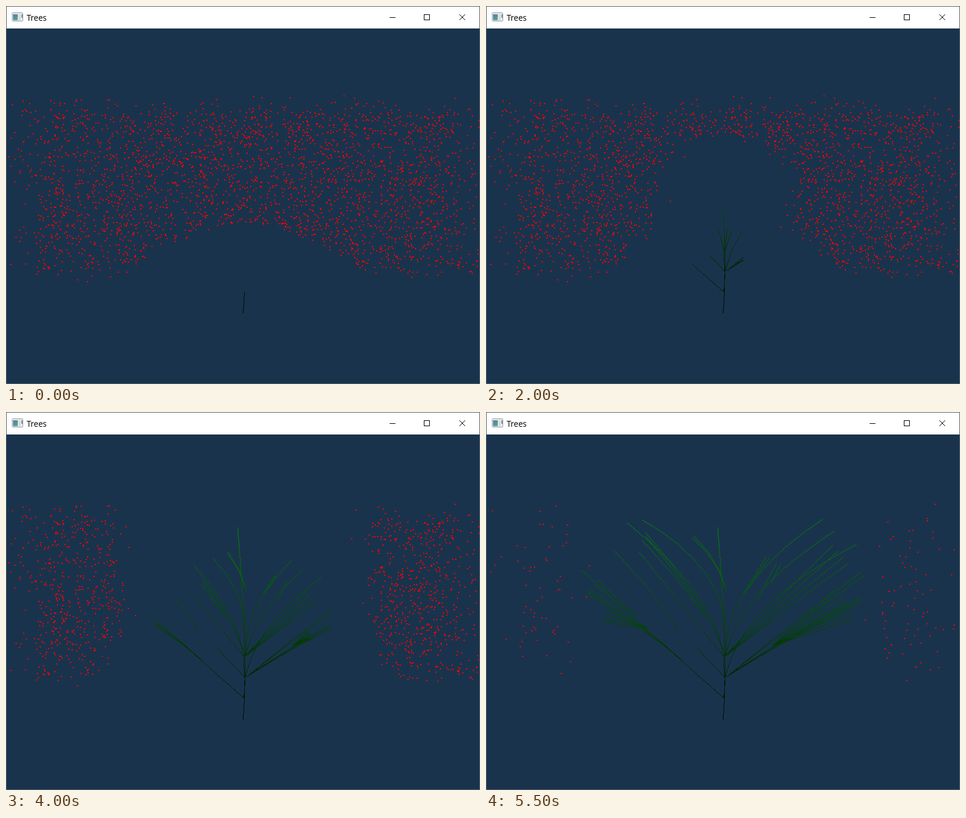
Write an HTML page with a canvas that moves like this. It is 802 by 639 pixels and loops after 6000 ms.

```html
<!DOCTYPE html>
<html lang="en">
<head>
<meta charset="utf-8">
<title>Trees</title>
<style>
html, body { margin: 0; width: 100%; height: 100%; overflow: hidden; background: #1a334c; }
canvas, svg { position: absolute; left: 0; top: 0; display: block; }
text { font: 13.6px "Open Sans", "Noto Sans", sans-serif; }
</style>
</head>
<body>
<canvas id="scene" width="802" height="639"></canvas>
<svg width="802" height="639" viewBox="0 0 802 639">
  <defs>
    <linearGradient id="pane" x2="1" y2="1">
      <stop offset="0" stop-color="#4a77a8"/>
      <stop offset="1" stop-color="#5fae8c"/>
    </linearGradient>
  </defs>
  <rect x="1" y="1" width="800" height="37" fill="#fff"/>
  <rect x=".5" y=".5" width="801" height="638" fill="none" stroke="#53626f"/>
  <rect x="10.5" y="11.5" width="18" height="14" rx="1" fill="#eef0f2" stroke="#8d949b"/>
  <rect x="12" y="14" width="8" height="10" fill="url(#pane)"/>
  <rect x="21" y="14" width="4" height="10" fill="#d5dade"/>
  <rect x="26" y="14" width="2" height="6" fill="#7d93ab"/>
  <text x="35" y="25">Trees</text>
  <g fill="none" stroke="#000">
    <path d="M649 19.5h10"/>
    <rect x="707.5" y="14.5" width="9" height="9"/>
    <path d="M767.5 14.5l9 9m0-9l-9 9" stroke-linecap="square"/>
  </g>
</svg>
<script>
const STEP = 500, STEPS = 12;
const ctx = document.getElementById('scene').getContext('2d');
const mix = (a, b, t) => a + (b - a) * t;

let seed = 20417;
function rand() {
  seed = (seed + 0x6D2B79F5) | 0;
  let t = Math.imul(seed ^ (seed >>> 15), 1 | seed);
  t = (t + Math.imul(t ^ (t >>> 7), 61 | t)) ^ t;
  return ((t ^ (t >>> 14)) >>> 0) / 4294967296;
}

// Half width of the cleared dome: it rises and widens, with a skirt at its foot
function halfWidth(step, y) {
  const s = Math.min(step, 9.2);
  const depth = y - (365 - 38 * s);
  if (depth <= 0) return 0;
  const dome = (92 + 2 * s * s) * Math.sqrt(Math.min(1, depth / 60));
  const skirt = 1.3 * Math.max(0, y - 360) * (1 - s / 14);
  return dome + skirt;
}

// The step at which the tree reaches a dot; late on, dots also go at random
function reachedAt(x, y) {
  const lag = 45 * rand() ** 4, luck = rand();
  for (let s = 0; s < STEPS; s++) {
    const reach = halfWidth(s, y) - lag * Math.min(1, (s + 1) / 4);
    const chance = 0.86 * Math.max(0, (s - 7) / 4) ** 1.7;
    if (Math.abs(x - 403) < reach || luck < chance) return s;
  }
  return STEPS;
}

// A box of dots seen in perspective
const dots = [];
for (let i = 0; i < 3200; i++) {
  const near = mix(0.77, 1, rand() ** 1.8);
  const x = Math.round(411 + near * 432 * (rand() * 2 - 1));
  const y = Math.round(308 + near * 162 * (rand() * 2 - 1));
  if (x > 0 && x < 800) dots.push({ x, y, end: reachedAt(x, y) });
}

// A branch gains one segment per step while its heading (degrees from
// upright) eases towards another; copies fan out over a spread of angles
const segments = [];
function grow(birth, x, y, from, to, steps, length = 36, copies = 1, spread = 0) {
  for (let c = 0; c < copies; c++) {
    const tilt = copies > 1 ? spread * (c / (copies - 1) - 0.5) : 0;
    let a = [x, y], heading = from;
    for (let i = 0; i < steps; i++) {
      const r = (heading + tilt) * Math.PI / 180;
      const b = [a[0] + length * Math.sin(r), a[1] - length * Math.cos(r)];
      segments.push({ born: birth + i, a, b });
      a = b;
      heading = mix(heading, to, 0.2);
    }
  }
}

// Stem: almost straight
grow(0, 401, 519, 3, -6, 9);

// Left side, top to bottom
grow(7, 406, 302, -19, -85, 3, 36, 2, 2);
grow(5, 404, 376, -3, -78, 7);
grow(3, 403, 448, -2, -60, 9, 35.5);
grow(5, 400, 400, -24, -46, 7, 34);
grow(7, 371, 347, -34, -46, 5, 34, 2, 3);
grow(5, 402, 413, -39, -39, 7, 32.6);
grow(7, 323, 368, -32, -52, 5, 34);
grow(4, 403, 448, -43, -46, 2);
grow(3, 402, 483, -49, -47, 9);
grow(6, 330, 418, -50, -60, 6, 32.7, 3, 3);
grow(9, 255, 346, -50, -50, 3, 30, 2, 6);
grow(9, 275, 365, -75, -75, 3, 26, 4, 15);

// Right side, top to bottom
grow(4, 404, 413, 5, 68, 8, 37);
grow(7, 434, 308, 34, 34, 4, 19, 2, 4);
grow(7, 459, 316, 28, 28, 4, 17);
grow(9, 480, 292, 27, 27, 2, 19);
grow(4, 404, 413, 18, 66, 8);
grow(2, 402, 483, 4, 70, 10);
grow(5, 406, 410, 47, 51, 7, 36.8, 4, 9);
grow(5, 406, 411, 53, 53, 4, 25);
grow(4, 407, 447, 51, 55, 8, 36, 2, 1.5);
grow(4, 407, 447, 57, 63, 8, 32.7, 3, 2);
grow(8, 484, 395, 60, 60, 4, 36, 8, 24);

const bark = ctx.createLinearGradient(0, 519, 0, 146);
bark.addColorStop(0, '#000600');
bark.addColorStop(1, '#009c00');

// Hard one-pixel line
function line([x0, y0], [x1, y1]) {
  const n = Math.ceil(Math.max(Math.abs(x1 - x0), Math.abs(y1 - y0), 1));
  for (let i = 0; i <= n; i++)
    ctx.fillRect(Math.round(mix(x0, x1, i / n)), Math.round(mix(y0, y1, i / n)), 1, 1);
}

function draw(step) {
  ctx.fillStyle = '#1a334c';
  ctx.fillRect(0, 0, 802, 639);
  ctx.fillStyle = '#f00';
  for (const d of dots) if (d.end > step) ctx.fillRect(d.x, d.y, 2, 2);
  ctx.fillStyle = bark;
  for (const s of segments) if (s.born <= step) line(s.a, s.b);
}

const start = performance.now();
let shown = -1;
function tick() {
  const step = Math.floor((performance.now() - start) / STEP) % STEPS;
  if (step !== shown) draw(shown = step);
  requestAnimationFrame(tick);
}
tick();
</script>
</body>
</html>
```
